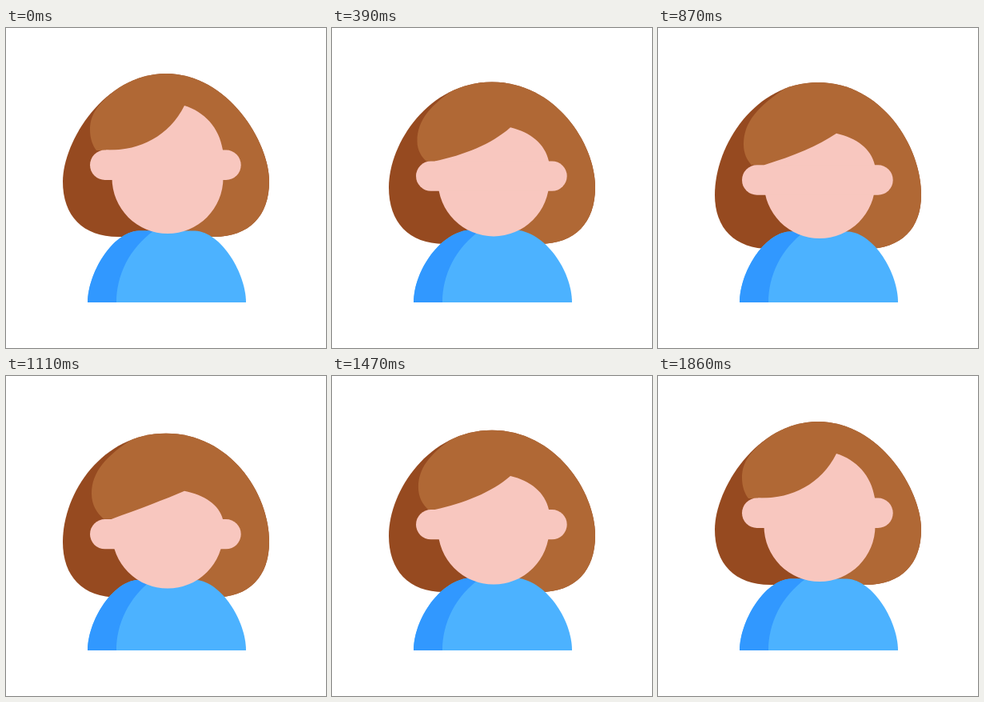
Recreate the animation shown at these times as an HTML page. Size 400 by 400 pixels, loop 4010 ms.

```html
<!DOCTYPE html>
<html lang="en">
<head>
<meta charset="utf-8">
<title>Nodding avatar</title>
<style>
  html, body { margin: 0; width: 100%; height: 100%; overflow: hidden; background: #fff; }
  svg { display: block; width: 100%; height: 100%; }
</style>
</head>
<body>
<svg viewBox="0 0 400 400">
  <defs>
    <clipPath id="hairClip"><path data-part="hair"/></clipPath>
    <clipPath id="bodyClip"><path data-part="body"/></clipPath>
  </defs>
  <path data-part="hair" fill="#964a20"/>
  <path data-part="lightHair" fill="#b06835" clip-path="url(#hairClip)"/>
  <path data-part="body" fill="#4cb2ff"/>
  <path d="M138 343C138 305 158 268 196 246V230H90V343Z" fill="#3198ff" clip-path="url(#bodyClip)"/>
  <path data-part="face" fill="#f8c7bf"/>
  <rect id="ears" x="105" width="188.7" height="37.4" rx="18.7" fill="#f8c7bf"/>
</svg>
<script>
const LOOP = 4010, STEP = 30;

// head: ear centre, chin, parting tip
// fringe: left x, then two control points
// seam: start, leftmost point and end of the shaded hair edge
// hair: crown control x, top, side control y, widest y, bottom
// body: lower control y, upper control, plateau start
const rest = {
  head: [171.3, 257, 97],
  fringe: [125, 164, 154, 203, 137],
  seam: [138, 77, 105, 127, 113, 153],
  hair: [123, 57, 142, 192, 261],
  body: [308, 132, 255, 166, 253.5]
};
const up = {
  head: [160.4, 251, 85.5],
  fringe: [127, 164, 142, 204, 125],
  seam: [155, 65, 106, 132, 107, 143],
  hair: rest.hair,
  body: [302, 137, 248.5, 186, 248.5]
};
const down = {
  head: [207.7, 269, 159.5],
  fringe: [130, 165, 174, 195, 164],
  seam: [156, 83, 107, 150, 129, 188.5],
  hair: [120, 77, 145, 206, 278],
  body: [306, 134, 258, 164, 255.5]
};
const middle = {
  head: [188.8, 262.6, 130],
  fringe: [133, 170, 159, 201, 146],
  seam: [162, 73, 107, 145, 116, 170],
  hair: [122, 67.3, 146, 209, 276],
  body: [306, 132, 256.5, 164, 254.5]
};
const upAgain = { ...up, seam: [143, 73, 109, 127, 111, 143] };

const keys = [
  [0, rest], [210, up], [560, down], [930, middle],
  [1305, down], [1650, upAgain], [1860, rest]
];

const ease = u => (1 - Math.cos(Math.PI * u)) / 2;
const mix = (a, b, u) => a + (b - a) * u;

function poseAt(time) {
  const next = keys.findIndex(([at]) => at > time);
  if (next < 0) return rest;
  const [t0, from] = keys[next - 1], [t1, to] = keys[next];
  const u = ease((time - t0) / (t1 - t0));
  return Object.fromEntries(Object.keys(from).map(name =>
    [name, from[name].map((v, i) => mix(v, to[name][i], u))]));
}

function hairPath([crownX, top, sideY, wideY, bottom]) {
  const low = mix(wideY, bottom, 0.62), flip = x => 400 - x;
  return `M200 ${top}C${crownX} ${top} 71 ${sideY} 71 ${wideY}` +
    `C71 ${low} 96 ${bottom} 140 ${bottom}H260` +
    `C304 ${bottom} 329 ${low} 329 ${wideY}` +
    `C329 ${sideY} ${flip(crownX)} ${top} 200 ${top}Z`;
}

function lightHairPath([x0, y0, mx, my, ex, ey]) {
  return `M${x0} ${y0}C${mix(x0, mx, 0.65)} ${mix(y0, my, 0.32)} ` +
    `${mx} ${mix(y0, my, 0.6)} ${mx} ${my}` +
    `C${mx} ${mix(my, ey, 0.45)} ${mix(mx, ex, 0.45)} ${mix(my, ey, 0.78)} ${ex} ${ey}` +
    `H201V300H400V0H201Z`;
}

function bodyPath([lowY, cx, cy, x, top]) {
  const flip = v => 402 - v;
  return `M102 343C102 ${lowY} ${cx} ${cy} ${x} ${top}H${flip(x)}` +
    `C${flip(cx)} ${cy} 300 ${lowY} 300 343Z`;
}

function facePath([ear, chin, tip], [left, ax, ay, bx, by]) {
  const earTop = ear - 18.7, r = 69.5, middleY = chin - r;
  return `M${left} ${earTop}C${ax} ${ay} ${bx} ${by} 223 ${tip}` +
    `C248 ${mix(tip, earTop, 0.14)} 266.5 ${mix(tip, earTop, 0.49)} 271 ${earTop}` +
    `L271.5 ${middleY}A${r} ${r} 0 0 1 132.5 ${middleY}Z`;
}

const parts = [...document.querySelectorAll('[data-part]')];
const ears = document.getElementById('ears');
const start = performance.now();

function draw() {
  const elapsed = Math.max(0, performance.now() - start) % LOOP;
  const pose = poseAt(Math.floor(elapsed / STEP) * STEP);
  const paths = {
    hair: hairPath(pose.hair),
    lightHair: lightHairPath(pose.seam),
    body: bodyPath(pose.body),
    face: facePath(pose.head, pose.fringe)
  };
  for (const part of parts) part.setAttribute('d', paths[part.dataset.part]);
  ears.setAttribute('y', pose.head[0] - 18.7);
  requestAnimationFrame(draw);
}
draw();
</script>
</body>
</html>
```
